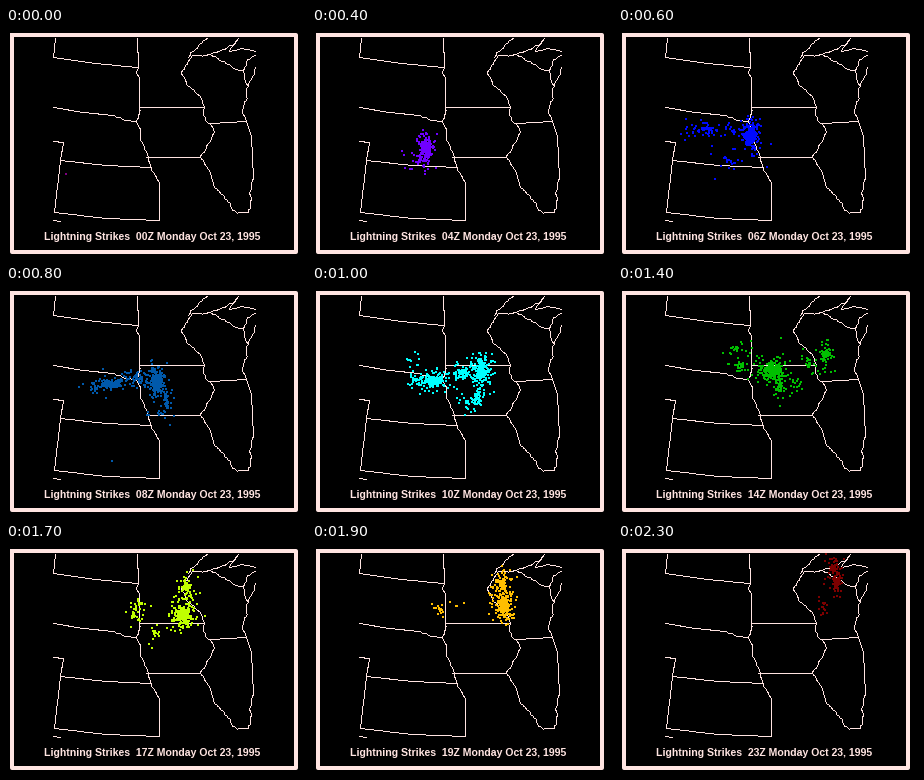
Animation, 300 px wide and 230 px high, one loop 2400 ms. Source, as a matplotlib script:

```python
import colorsys

import matplotlib.pyplot as plt
import numpy as np
from matplotlib.animation import FuncAnimation

W, H, DPI = 300, 230, 80
HOURS = 24
PX = 72 / DPI
PINK = (255, 228, 225)
INK = "#ffe4e1"

fig = plt.figure(figsize=(W / DPI, H / DPI), dpi=DPI, facecolor="black")
ax = fig.add_axes([0, 0, 1, 1])
base = np.zeros((H, W, 3), np.uint8)
kinks = np.random.default_rng(7)


def border(*pts):
    """Paint a hard line, one pixel wide, through the points."""
    for (x0, y0), (x1, y1) in zip(pts, pts[1:]):
        n = int(max(abs(x1 - x0), abs(y1 - y0))) + 1
        xs = np.rint(np.linspace(x0, x1, n + 1)).astype(int)
        ys = np.rint(np.linspace(y0, y1, n + 1)).astype(int)
        base[ys, xs] = PINK


def river(*pts, rough=0.13):
    """A border roughened by splitting each stretch until it is short."""
    for (x0, y0), (x1, y1) in zip(pts, pts[1:]):
        size = np.hypot(x1 - x0, y1 - y0)
        if size < 4:
            border((x0, y0), (x1, y1))
        else:
            dx, dy = kinks.uniform(-rough, rough, 2) * size
            river((x0, y0), ((x0 + x1) / 2 + dx, (y0 + y1) / 2 + dy),
                  (x1, y1), rough=rough)


# Dakotas
border((49, 10), (47, 29), (89, 35), (131, 39))
border((131, 10), (132, 39), (130, 44), (133, 50), (133, 79))
border((47, 79), (77, 84), (107, 87))

# Nebraska and Kansas
border((47, 113), (57, 114), (54, 132), (48, 184))
border((54, 132), (100, 137), (145, 139))
border((48, 184), (100, 190), (153, 192), (153, 154))
border((47, 192), (54, 193))
river((107, 87), (130, 93), (138, 118), (144, 137), (153, 154))
river((133, 79), (130, 93))

# Iowa
border((133, 79), (197, 79))
border((140, 129), (194, 129))

# Wisconsin and the lakes
river((187, 27), (181, 34), (175, 44), (180, 56), (194, 68), (197, 86),
      (204, 96))
border((204, 95), (240, 93))
river((240, 93), (237, 78), (240, 61), (249, 39))
river((241, 57), (237, 42), (222, 36), (205, 27))
river((182, 29), (201, 10))
river((187, 27), (203, 26), (216, 21), (232, 10))
river((231, 12), (223, 23), (236, 20), (249, 23))
river((249, 27), (240, 33), (237, 42))

# Illinois
river((204, 96), (208, 104), (203, 114), (194, 129), (206, 152), (213, 163),
      (224, 175), (231, 185), (242, 184), (245, 170), (247, 150))
border((247, 150), (245, 108), (240, 93))

storms = []


def storm(hours, start, bend, end, spread, peak):
    """A cluster that drifts on a curve, swells to its peak and dies away."""
    storms.append((hours, np.array((start, bend, end)), np.array(spread), peak))


# Southern storm, crossing Nebraska and Iowa to Illinois
storm((0, 8), (59, 145), (135, 118), (104, 140), ((0, 0), (18, 12)), 34)
storm((1, 15), (86, 140), (150, 88), (215, 64), ((3, 6), (5, 8)), 290)
storm((6, 18), (152, 116), (182, 112), (142, 84), ((3, 8), (3, 5)), 55)
storm((6, 16), (150, 134), (150, 112), (190, 90), ((8, 6), (4, 4)), 25)
# Western storm, crossing Iowa to Lake Superior
storm((5, 25), (76, 100), (169, 98), (230, 20), ((9, 3), (2.5, 8)), 280)
storm((5, 15), (100, 104), (148, 83), (200, 74), ((9, 3), (3, 7)), 80)
storm((14, 25), (168, 52), (186, 40), (228, 14), ((7, 9), (3, 6)), 90)
storm((17, 26), (194, 76), (196, 66), (216, 56), ((3, 5), (4, 6)), 18)
# Stragglers in the Dakotas
storm((5, 22), (62, 112), (148, 77), (122, 56), ((8, 7), (3, 3)), 32)
storm((8, 20), (92, 82), (112, 52), (150, 62), ((9, 4), (6, 3)), 18)


def strikes(hour):
    rng = np.random.default_rng(100 + hour)
    for (first, last), (p, q, r), (s0, s1), peak in storms:
        if not first <= hour <= last:
            continue
        u = (hour - first) / (last - first)
        centre = (1 - u) ** 2 * p + 2 * u * (1 - u) * q + u * u * r
        spread = s0 + (s1 - s0) * u
        n = max(1, round(peak * np.sin(np.pi * u)))
        # A varying reach gives a dense core with loose strikes around it
        reach = rng.uniform(0.2, 1.6, (n, 1))
        offset = rng.normal(size=(n, 2)).clip(-2, 2) * reach * spread
        yield from np.rint(centre + offset).astype(int)


def colour(hour):
    hue = np.interp(hour, (0, 4, 10, 14, 19, 23),
                    (0.83, 0.74, 0.5, 0.333, 0.124, 0))
    value = np.interp(hour, (0, 4, 6, 8, 10, 12, 14, 16, 21, 23),
                      (0.5, 1, 1, 0.67, 1, 1, 0.75, 1, 1, 0.49))
    return [round(255 * c) for c in colorsys.hsv_to_rgb(hue, 1, value)]


def stage(hour):
    img = base.copy()
    rgb = colour(hour)
    for x, y in strikes(hour):
        if x >= 49 and y >= 9:
            img[y:y + 2, x:x + 2] = rgb
    return img


picture = ax.imshow(stage(0), extent=(0, W, H, 0), interpolation="nearest",
                    aspect="auto")
ax.plot([6, 290, 290, 6, 6], [7, 7, 224, 224, 7], color=INK, lw=4 * PX,
        solid_joinstyle="round")
label = ax.text(38, 212, "", color=INK, family="Liberation Sans",
                weight="bold", size=10.52 * PX, va="baseline")
ax.set_xlim(0, W)
ax.set_ylim(H, 0)
ax.axis("off")


def update(hour):
    picture.set_data(stage(hour))
    label.set_text(f"Lightning Strikes  {hour:02d}Z Monday Oct 23, 1995")
    return picture, label


anim = FuncAnimation(fig, update, frames=HOURS, interval=100, repeat=True,
                     repeat_delay=0)
plt.show()
```
